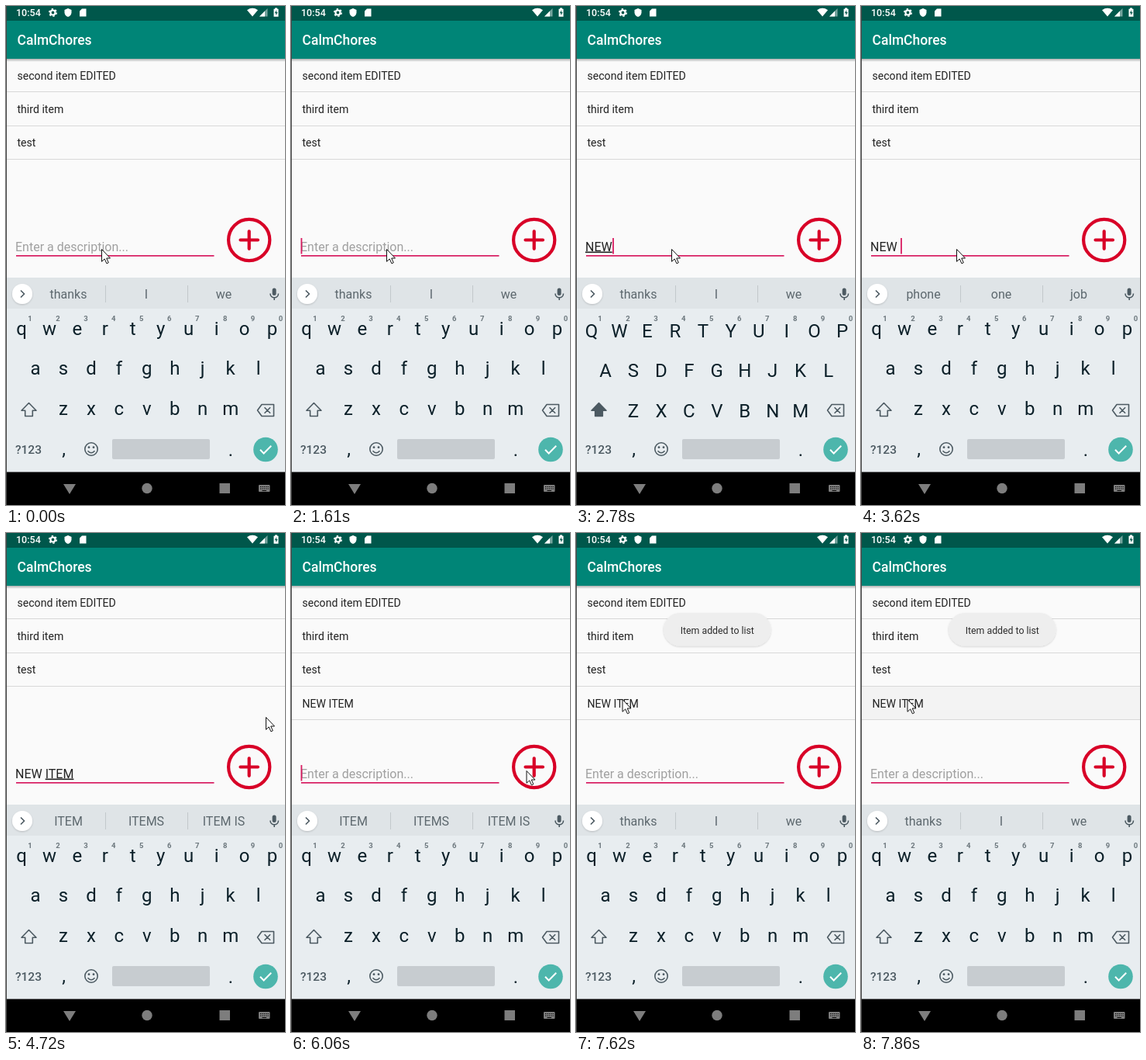
Recreate the animation shown at these times as an HTML page. Size 360x643 px, loop 8 s.

```html
<!DOCTYPE html>
<html lang="en">
<head>
<meta charset="utf-8">
<title>To-do list</title>
<style>
  html, body { margin: 0; width: 100%; height: 100%; overflow: hidden; background: #fafafa; }
  svg { display: block; width: 360px; height: 643px; font-family: Roboto, sans-serif; }
  .mid { text-anchor: middle; }
  .list { font-size: 14.1px; fill: #222; }
  .field { font-size: 16px; }
  .word { font-size: 16px; fill: #5d686e; }
  .key { font-size: 24px; fill: #0c2029; }
  .digit { font-size: 9.5px; font-weight: 700; fill: #6c777d; }
  .line { fill: none; stroke: #4c5a62; stroke-width: 1.6; }
  #comp { text-decoration: underline; }
</style>
</head>
<body>
<svg viewBox="0 0 360 643">
  <defs>
    <linearGradient id="shade" x2="0" y2="1">
      <stop stop-color="#000" stop-opacity=".3"/>
      <stop offset="1" stop-color="#000" stop-opacity="0"/>
    </linearGradient>
    <filter id="soft" x="-20%" y="-20%" width="140%" height="150%">
      <feDropShadow dx="0" dy="1" stdDeviation="1" flood-opacity=".18"/>
    </filter>
  </defs>
  <rect width="360" height="643" fill="#fafafa"/>

  <!-- List -->
  <rect id="press" x="1" y="198" width="359" height="42" fill="#f3f3f3"/>
  <g id="list"></g>

  <!-- Status and app bar -->
  <rect y="68" width="360" height="4" fill="url(#shade)"/>
  <rect width="360" height="19" fill="#00574b"/>
  <rect y="19" width="360" height="49" fill="#008577"/>
  <g fill="#fff">
    <text x="13" y="13" font-size="12.5" font-weight="500">10:54</text>
    <text x="14.5" y="50" font-size="17.5" font-weight="500">CalmChores</text>
    <circle cx="60.5" cy="8.5" r="3" fill="none" stroke="#fff" stroke-width="2.2"/>
    <circle cx="60.5" cy="8.5" r="4.7" fill="none" stroke="#fff" stroke-width="1.6" stroke-dasharray="2.4 2.52"/>
    <path d="M80 3l4.5 2v3.2c0 2.8-2 5-4.500 5.800c-2.500-.8-4.500-3-4.500-5.800V5z"/>
    <path d="M98 3.500h5.500v10h-8.500v-7z"/>
    <path d="M311 5.200q7-4.800 14 0l-7 8.300z"/>
    <path d="M337.500 3v10.500h-10.500z" opacity=".45"/>
    <path d="M334 6.500v7h-7z"/>
    <path d="M347 2.500h3v1.200h1.500v10h-6v-10h1.500z"/>
  </g>
  <path d="M349.200 5l-2.500 4.300h1.600v3l2.300-4.200h-1.600z" fill="#00574b"/>

  <!-- Entry field -->
  <rect x="13" y="321" width="255.500" height="1.700" fill="#d81b60"/>
  <text id="hint" class="field" x="12" y="315.500" fill="#a0a0a0">Enter a description...</text>
  <text id="entry" class="field" x="12" y="315.500" fill="#222"><tspan id="done"></tspan><tspan id="comp"></tspan></text>
  <rect id="caret" y="299" width="1.800" height="20.500" fill="#d81b60"/>
  <g fill="none" stroke="#d80027" stroke-width="4.200" stroke-linecap="round">
    <circle cx="313.700" cy="301.500" r="26.600"/>
    <path d="M302.500 301.500h22.500M313.700 290.300v22.500"/>
  </g>

  <!-- Keyboard -->
  <rect y="350" width="360" height="251" fill="#e8edf0"/>
  <rect y="350" width="360" height="40" fill="#dfe4e7"/>
  <path d="M128.500 360v22M234.500 360v22" stroke="#c2c8cb"/>
  <circle cx="21" cy="371" r="13" fill="#fff" filter="url(#soft)"/>
  <path d="M19 366.500l4.500 4.500l-4.500 4.500" class="line" stroke-width="2"/>
  <rect x="343.600" y="363.500" width="5" height="9.500" rx="2.500" fill="#4c5a62"/>
  <path d="M341 370.500c0 7 10.500 7 10.500 0M346.200 376v3" class="line"/>
  <g id="words"></g>
  <g id="keys"></g>
  <path id="shift" class="line" stroke-linejoin="round" d="M29.500 511.500l9.500 9.700h-4.700v7.300h-9.600v-7.300h-4.700z"/>
  <path class="line" stroke-linejoin="round" d="M330 513.500h15.500v15h-15.500l-5.500-7.500zM333.500 517.200l7.600 7.600M341.100 517.200l-7.600 7.600"/>
  <text x="12" y="576.500" font-size="15.500" font-weight="500" fill="#4c5a62">?123</text>
  <text class="key mid" x="74.500" y="579">,</text>
  <text class="key mid" x="290" y="580" font-size="22">.</text>
  <circle class="line" cx="110" cy="571" r="8.200"/>
  <path class="line" d="M105.500 573.200q4.500 5 9 0"/>
  <circle cx="107" cy="568.700" r="1.400" fill="#4c5a62"/>
  <circle cx="113" cy="568.700" r="1.400" fill="#4c5a62"/>
  <rect x="137" y="558" width="126" height="26" rx="2" fill="#c7ccd0"/>
  <circle cx="335" cy="571.500" r="15.800" fill="#4db6ac"/>
  <path d="M328 571.800l4.600 4.700l9.600-9.800" fill="none" stroke="#fff" stroke-width="2"/>

  <!-- Navigation bar -->
  <rect y="600.500" width="360" height="43"/>
  <g fill="#7d7d7d">
    <path d="M74 616h16l-8 13z"/>
    <circle cx="182" cy="621.500" r="6.700"/>
    <rect x="275.500" y="615" width="13.500" height="13"/>
    <rect x="326" y="617" width="14.500" height="9" rx="1"/>
  </g>
  <path d="M328 619.500h11M328 622h11" stroke="#000" stroke-width="1.200" stroke-dasharray="1.200 1.200"/>
  <path d="M330.500 624.500h5.500" stroke="#000"/>

  <g id="toast">
    <rect x="113" y="103" width="138.500" height="42.500" rx="21.200" fill="#eee" filter="url(#soft)"/>
    <text class="mid" x="182.300" y="129.500" font-size="12.300" fill="#2c2c2c">Item added to list</text>
  </g>
  <rect width="1" height="643" fill="#444"/>
  <path id="mouse" d="M.5 .5V16.300L4.200 12.900L6.900 18.800L9.300 17.700L6.700 12H11.500Z" fill="#fff" stroke="#111"/>
</svg>
<script>
const $ = id => document.getElementById(id);

function add(parent, tag, attrs, text = '') {
  const el = document.createElementNS('http://www.w3.org/2000/svg', tag);
  for (const name in attrs) el.setAttribute(name, attrs[name]);
  el.textContent = text;
  return parent.appendChild(el);
}

const rows = ['second item EDITED', 'third item', 'test', 'NEW ITEM'].map((label, i) => {
  const row = add($('list'), 'g', {});
  add(row, 'text', { class: 'list', x: 14.5, y: 94.9 + 43.25 * i }, label);
  add(row, 'rect', { y: Math.round(110.4 + 43.3 * i), width: 360, height: 1, fill: '#d8d8d8' });
  return row;
});

const letters = [];
[['qwertyuiop', 20, 424], ['asdfghjkl', 38, 475], ['zxcvbnm', 74, 527.3]].forEach(([chars, x, y], r) => {
  [...chars].forEach((char, i) => {
    const el = add($('keys'), 'text', { class: 'key mid', x: x + 35.95 * i });
    letters.push({ el, char, y });
    if (!r) add($('keys'), 'text', { class: 'digit mid', x: 31 + 35.95 * i, y: 406 }, (i + 1) % 10);
  });
});

const words = [80.5, 181, 281].map(x => add($('words'), 'text', { class: 'word mid', x, y: 377 }));

const idle = ['thanks', 'I', 'we'];
// Each step changes part of the state at a time in ms.
const steps = [
  [0, { done: '', comp: '', caret: 0, caps: 0, words: idle, mouse: [123, 313], added: 0, toast: 0, press: 0 }],
  [120, { caret: 1 }],
  [650, { caret: 0 }],
  [1180, { caret: 1 }],
  [1730, { caret: 0 }],
  [2100, { caret: 1 }],
  [2540, { comp: 'N', caps: 1 }],
  [2660, { comp: 'NE' }],
  [2780, { comp: 'NEW' }],
  [2900, { caps: 0, words: ['NEW', 'NEWS', 'NEXT'] }],
  [3300, { caret: 0 }],
  [3620, { done: 'NEW\u00a0', comp: '', caret: 1, words: ['phone', 'one', 'job'] }],
  [3770, { comp: 'I' }],
  [3890, { comp: 'ITE' }],
  [4010, { comp: 'ITEM', words: ['ITEM', 'ITEMS', 'ITEM IS'] }],
  [4410, { mouse: [119, 313] }],
  [4560, { mouse: [178, 243], caret: 0 }],
  [4720, { mouse: [335, 237] }],
  [4870, { mouse: [348, 258] }],
  [4990, { mouse: [326, 292] }],
  [5110, { mouse: [301, 304], caret: 1 }],
  [5510, { mouse: [302, 305], caret: 0 }],
  [5790, { mouse: [303, 306] }],
  [5910, { mouse: [303.5, 306], caret: 1 }],
  [6060, { done: '', comp: '', added: 1 }],
  [6310, { toast: 0.35 }],
  [6460, { toast: 0.8, mouse: [296, 327] }],
  [6610, { toast: 1, mouse: [230, 300], caret: 0 }],
  [6730, { mouse: [150, 256], words: idle }],
  [6850, { mouse: [85, 224] }],
  [6970, { mouse: [59.5, 214] }],
  [7120, { caret: 1 }],
  [7620, { caret: 0 }],
  [7740, { press: 0.5 }],
  [7860, { press: 1 }]
];

function draw(s) {
  $('done').textContent = s.done;
  $('comp').textContent = s.comp;
  const typed = s.done + s.comp;
  $('hint').style.opacity = typed ? 0 : 1;
  $('caret').setAttribute('x', typed ? 12.4 + $('entry').getComputedTextLength() : 12.6);
  $('caret').style.opacity = s.caret;
  $('toast').style.opacity = s.toast;
  $('press').style.opacity = s.press;
  rows[3].style.opacity = s.added;
  $('mouse').setAttribute('transform', `translate(${s.mouse})`);
  $('shift').style.fill = s.caps ? '#4c5a62' : 'none';
  words.forEach((el, i) => el.textContent = s.words[i]);
  for (const { el, char, y } of letters) {
    el.textContent = s.caps ? char.toUpperCase() : char;
    el.setAttribute('y', s.caps ? y + 2.5 : y);
  }
}

let shown = 0;
function tick() {
  const t = performance.now() % 8000;
  const count = steps.filter(([at]) => at <= t).length;
  if (count !== shown) {
    shown = count;
    draw(Object.assign({}, ...steps.slice(0, count).map(step => step[1])));
  }
  requestAnimationFrame(tick);
}
tick();
</script>
</body>
</html>
```
